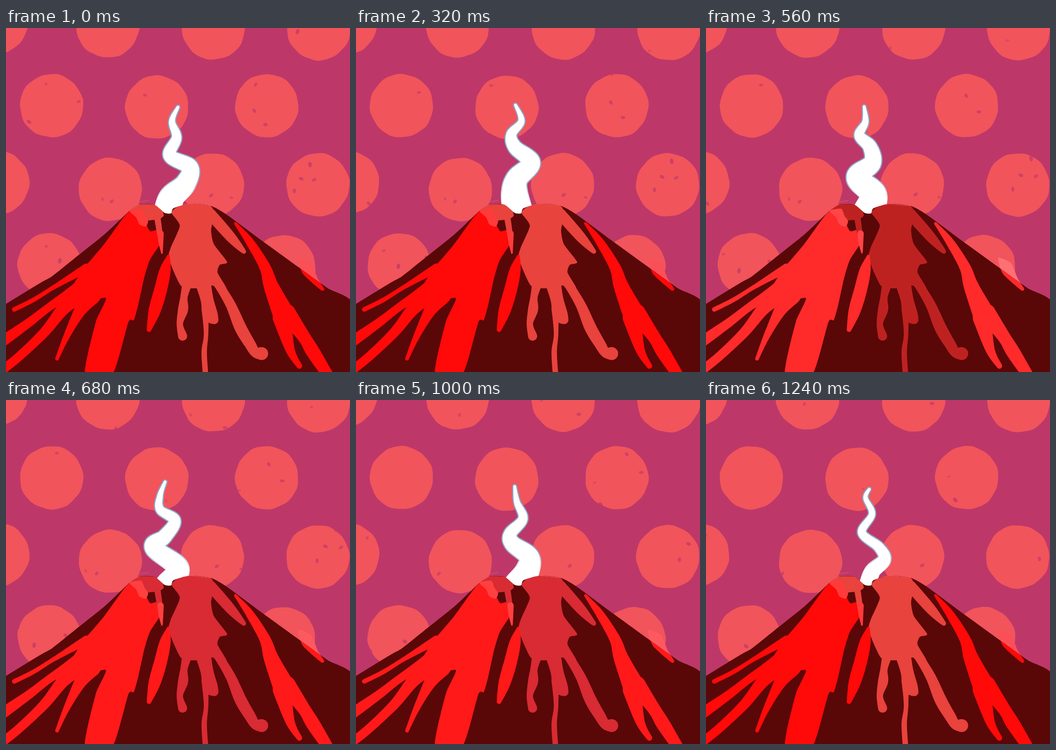
An HTML page with a canvas for the animation above (1.28 s loop, 748 by 748 pixels).

```html
<!DOCTYPE html>
<html lang="en">
<head>
<meta charset="utf-8">
<title>Volcano</title>
<style>
html, body { margin: 0; width: 100%; height: 100%; overflow: hidden; background: #bd3869; }
canvas { display: block; width: 748px; height: 748px; }
</style>
</head>
<body>
<canvas id="stage" width="748" height="748"></canvas>
<script>
const ctx = document.getElementById('stage').getContext('2d');
const SIZE = 748, STEP = 40, FRAMES = 32;
const BG = '#bd3869', DOT = '#f1545b', ROCK = '#5a0708';

const points = s => s.trim().split(/\s+/).map(p => p.split(',').map(Number));
const lerp = (a, b, f) => a + (b - a) * f;

function random(seed) {
  const x = Math.sin(seed * 127.1 + 11.7) * 43758.5453;
  return x - Math.floor(x);
}

// Catmull-Rom blend of four values.
const spline = (a, b, c, d, f) =>
  b + f / 2 * (c - a + f * (2 * a - 5 * b + 4 * c - d + f * (3 * (b - c) + d - a)));

// Closed, slightly rounded outline through the points.
function blob(pts, k = 0.1) {
  const path = new Path2D(), n = pts.length, at = i => pts[(i + n) % n];
  path.moveTo(...pts[0]);
  pts.forEach((b, i) => {
    const a = at(i - 1), c = at(i + 1), d = at(i + 2);
    path.bezierCurveTo(
      b[0] + (c[0] - a[0]) * k, b[1] + (c[1] - a[1]) * k,
      c[0] - (d[0] - b[0]) * k, c[1] - (d[1] - b[1]) * k, ...c);
  });
  return path;
}

// Band of discs along a spine of [x, y, radius] knots.
function ribbon(knots, grow = 0) {
  const path = new Path2D(), last = knots.length - 1;
  const at = i => knots[Math.max(0, Math.min(last, i))];
  for (let i = 0; i < last; i++) {
    for (let f = 0; f <= 1; f += 1 / 24) {
      const [x, y, r] = [0, 1, 2].map(n => spline(at(i - 1)[n], at(i)[n], at(i + 1)[n], at(i + 2)[n], f));
      const size = Math.max(1, r) + grow;
      path.moveTo(x + size, y);
      path.arc(x, y, size, 0, 2 * Math.PI);
    }
  }
  return path;
}

const shape = s => blob(points(s));
const flow = s => ribbon(points(s));

function fill(color, ...paths) {
  ctx.fillStyle = color;
  paths.forEach(p => ctx.fill(p));
}

const dots = points(`-22,-12 221,-4.5 451,0 680,1.5 99,169 328,172 567,169
  -18,336 227,351 449,341 678,341 94,515 604,519`);

// Specks all drift outward from one centre.
const CENTRE = [387, 375], ZOOM = 0.000276;
const specks = points(`564,210 540,180 543,123 487,227 497,263 87,122 158,160 50,204
  117,506 88,475 174,489 627,354 670,330 642,328 661,297 446,364 490,369 210,372 230,377
  302,146 355,246 264,115 461,114 399,91 634,8 617,77 58,381 112,318 640,523`);

const mountain = shape(`-9,605 0,600 75,554 100,540 150,500 215,448 268,398 290,384 322,384
  345,402 359,403 364,392 400,382 446,387 480,406 560,465 640,523 700,566 757,602 757,757 -9,757`);

const brightLava = [
  shape(`262,404 284,394 304,425 314,442 337,437 341,460 313,504 300,545 288,600 278,635
    266,640 232,752 172,752 195,640 217,587 160,602 125,598 165,528 190,498 215,468`),
  flow('18,612,5 60,591,5 105,563,5 175,522,10'),
  flow('-6,680,12 48,642,10 95,606,9 140,578,13 200,545,25'),
  flow('-6,742,10 30,713,10 84,661,11 125,610,14 165,575,20'),
  flow('111,719,4 131,672,7 160,616,13 185,580,22'),
  flow('353,496,3 346,527,12 336,570,14 323,615,13 311,656,5'),
  flow('499,425,3 530,465,9 563,520,12 576,560,16 598,610,22 612,640,26'),
  flow('600,630,20 618,700,10 638,735,6'),
  flow('610,620,20 648,672,14 668,705,15 700,755,12')
];

const dullLava = [
  shape(`400,382 372,389 360,402 378,430 358,478 354,502 380,560 412,566 448,560 480,568
    460,532 465,515 481,509 452,470 446,440 452,408 446,388`),
  flow('394,555,11 387,585,8 385,612,11 378,643,7 384,670,10'),
  flow('428,552,17 437,590,14 444,622,16 453,635,9'),
  flow('433,610,8 435,665,5 431,705,6 434,755,6'),
  flow('458,552,10 470,570,10 490,605,11 510,652,13 531,688,12 542,705,11 556,708,14'),
  flow('445,405,12 467,430,12 489,455,11 506,474,8 517,486,5')
];

const crest = [
  shape('270,397 290,384 322,384 338,393 343,408 332,416 308,419 300,428 284,398'),
  flow('329,412,7 334,445,6 339,489,2')
];
const overlaps = [
  shape('268,397 294,393 301,408 309,420 304,432 290,427 283,412'),
  flow('336,447,7 337,468,5 339,487,2')
];
const sliver = shape('635,500 663,511 678,545 692,567 685,570 646,535');

const tones = [
  { bright: '#ff0909', dull: '#e8433c', overlap: '#ff3b3a', veil: '#fb4f57' },
  { bright: '#ff1919', dull: '#d82b33', overlap: '#ff4040', veil: '#fe5961' },
  { bright: '#ff2a2a', dull: '#be2220', overlap: '#ff4545', veil: '#ff7074' }
];

// Smoke poses: time, girth, and the spine from vent to tip.
const poses = [
  [0, 26, '352,402 360,368 390,338 400,303 356,277 371,238 361,203 374,172'],
  [160, 20, '352,402 332,357 368,325 386,295 345,264 346,235 362,205 353,172'],
  [440, 34, '352,402 354,358 337,328 378,290 346,255 332,228 358,200 342,164'],
  [680, 22, '352,402 374,364 320,320 345,297 367,262 335,238 335,208 346,178'],
  [880, 29, '352,402 385,368 345,328 340,300 371,260 362,238 352,210 352,182'],
  [1000, 25, '352,402 372,372 376,340 340,312 336,290 363,258 350,222 345,188'],
  [1240, 14, '352,402 362,372 388,346 376,320 339,288 361,248 347,213 355,194']
].map(([t, girth, spine]) => ({ t, girth, spine: points(spine) }));

const rim = ctx.createLinearGradient(0, 325, 0, 375);
rim.addColorStop(0, '#8fa3c6');
rim.addColorStop(1, '#ffffff');

function drawDots(t) {
  const field = new Path2D();
  dots.forEach(([x, y], i) => {
    const edge = Array.from({ length: 36 }, (_, k) => {
      const a = k * Math.PI / 18;
      const r = 68.7 + 0.6 * Math.sin(5 * a + i * 2.1 + t / 130) + 0.5 * Math.sin(11 * a + i - t / 90);
      return [x + r * Math.cos(a), y + r * Math.sin(a)];
    });
    field.addPath(blob(edge, 1 / 6));
  });
  fill(DOT, field);

  ctx.save();
  ctx.clip(field);
  ctx.fillStyle = BG;
  const zoom = Math.exp(ZOOM * t);
  specks.forEach(([x, y], i) => {
    const r = 2.5 + 2.5 * random(i);
    ctx.globalAlpha = 0.1 + r * 0.12;
    ctx.beginPath();
    ctx.ellipse(lerp(CENTRE[0], x, zoom), lerp(CENTRE[1], y, zoom), r * 1.2, r * 0.8, i, 0, 2 * Math.PI);
    ctx.fill();
  });
  ctx.restore();
}

function drawSmoke(t) {
  const i = Math.max(0, poses.findIndex(p => p.t >= t) - 1);
  const a = poses[i], b = poses[i + 1], f = (t - a.t) / (b.t - a.t);
  const girth = lerp(a.girth, b.girth, f);
  const knots = a.spine.map(([x, y], k) =>
    [lerp(x, b.spine[k][0], f), lerp(y, b.spine[k][1], f), 3 + girth * (1 - k / 7)]);
  fill(rim, ribbon(knots, 2.5));
  fill('#fff', ribbon(knots));
}

function draw(frame) {
  const t = frame * STEP;
  const tone = tones[Math.floor((3 * frame + 5) / 8) % 3];
  ctx.fillStyle = BG;
  ctx.fillRect(0, 0, SIZE, SIZE);
  drawDots(t);
  fill(tone.veil, sliver);
  drawSmoke(t);
  fill(ROCK, mountain);

  ctx.save();
  ctx.clip(mountain);
  fill(tone.dull, ...dullLava);
  fill(tone.bright, ...brightLava, sliver);
  fill(tone.dull, ...crest);
  fill(tone.overlap, ...overlaps);
  ctx.restore();

  ctx.strokeStyle = DOT;
  ctx.stroke(new Path2D('M266 398 290 383M290 378 310 375M385 385 400 382 446 387'));
}

const start = performance.now();
function tick() {
  draw(Math.floor((performance.now() - start) / STEP) % FRAMES);
  requestAnimationFrame(tick);
}
tick();
</script>
</body>
</html>
```
